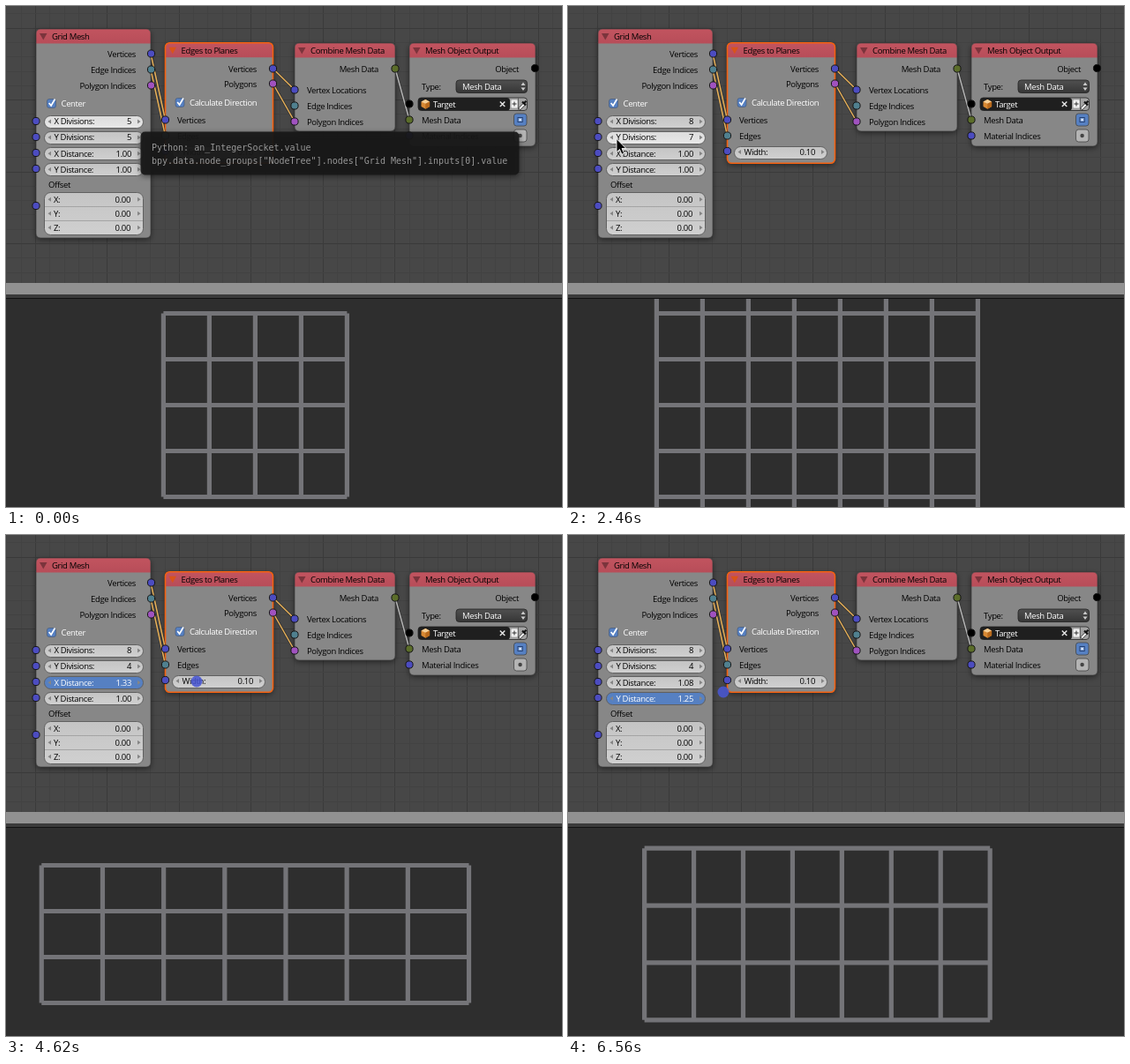
Recreate the animation shown at these times as an HTML page. Size 630 by 568 pixels, loop 6.6 s.

```html
<!DOCTYPE html>
<html lang="en">
<head>
<meta charset="utf-8">
<title>Grid mesh nodes</title>
<style>
  html, body { margin: 0; width: 100%; height: 100%; overflow: hidden; background: #2e2e2e; }
  svg { display: block; width: 630px; height: 568px; }
  text { font: 9.5px "Open Sans", "Noto Sans", sans-serif; letter-spacing: -.36px; white-space: pre; }
  .mono { font: 10px "DejaVu Sans Mono", monospace; letter-spacing: 0; }
</style>
</head>
<body>
<svg id="stage" viewBox="0 0 630 568" xmlns="http://www.w3.org/2000/svg">
  <defs>
    <linearGradient id="header" x2="0" y2="1"><stop stop-color="#c2545f"/><stop offset="1" stop-color="#b74d59"/></linearGradient>
    <linearGradient id="normal" x2="0" y2="1"><stop stop-color="#c4c4c4"/><stop offset="1" stop-color="#d0d0d0"/></linearGradient>
    <linearGradient id="hover" x2="0" y2="1"><stop stop-color="#dcdcdc"/><stop offset="1" stop-color="#e8e8e8"/></linearGradient>
    <linearGradient id="menu" x2="0" y2="1"><stop stop-color="#505050"/><stop offset="1" stop-color="#363636"/></linearGradient>
    <filter id="shadow" x="-15%" y="-15%" width="130%" height="130%">
      <feDropShadow dx="0" dy="2" stdDeviation="3" flood-color="#000" flood-opacity=".5"/>
    </filter>
    <clipPath id="viewport"><rect y="332" width="630" height="236"/></clipPath>
  </defs>
</svg>
<script>
const LOOP = 6600;
const UNIT = 52, CENTER_X = 282.4, CENTER_Y = 452.5;
const DRAG_RATE = 333;
const GRID_STEP = 16.29;
const BLUE = '#4c4cc0', TEAL = '#50808f', PURPLE = '#a052bf', OLIVE = '#5b6d2a', BLACK = '#000';
const stage = document.getElementById('stage');

function add(tag, attrs, parent = stage) {
  const el = document.createElementNS('http://www.w3.org/2000/svg', tag);
  for (const key in attrs) el.setAttribute(key, attrs[key]);
  parent.appendChild(el);
  return el;
}
const rect = (x, y, width, height, fill, more) => add('rect', { x, y, width, height, fill, ...more });
const path = (d, more) => add('path', { d, fill: 'none', ...more });

function label(x, y, text, fill = '#000', anchor = 'start') {
  const el = add('text', { x, y: y + 3.4, fill, 'text-anchor': anchor });
  el.textContent = text;
  return el;
}

function socket(cx, cy, fill) {
  add('circle', { cx, cy, r: 4.1, fill, stroke: '#151515', 'stroke-width': 1 });
}

function backdrop() {
  rect(0, 0, 630, 314, '#474747');
  const line = (d, major) => path(d, { stroke: major ? '#3a3a3a' : '#424242' });
  for (let i = -2; i < 37; i++) line(`M${Math.round(33 + i * GRID_STEP) + .5} 0V314`, i % 5 === 0);
  for (let i = -2; i < 17; i++) line(`M0 ${Math.round(269 - i * GRID_STEP) + .5}H630`, i % 5 === 0);
}

function node(x, y, w, h, title, active) {
  rect(x, y, w, h, '#878787', { rx: 5, filter: 'url(#shadow)' });
  path(`M${x} ${y + 16.5}V${y + 5}a5 5 0 0 1 5 -5H${x + w - 5}a5 5 0 0 1 5 5V${y + 16.5}Z`, { fill: 'url(#header)' });
  rect(x, y, w, h, 'none', { rx: 5, stroke: active ? '#f4600f' : '#3b3b3b', 'stroke-width': active ? 1.6 : .7 });
  path(`M${x + 4} ${y + 5}h8.5l-4.2 7.5Z`, { fill: active ? '#d9541a' : '#7b343c' });
  label(x + 18, y + 8.8, title);
}

function arrows(x, y, w) {
  return path(`M${x + 8} ${y - 2.5}l-3.5 2.5 3.5 2.5ZM${x + w - 7} ${y - 2.5}l3.5 2.5 -3.5 2.5Z`, { fill: '#858585' });
}

const FIELD_EDGE = { stroke: '#606060', 'stroke-width': 1 };

function numberField(x, y, w, name, value) {
  const box = rect(x + .5, Math.round(y - 7) + .5, w - 1, 14, 'url(#normal)', { rx: 7, ...FIELD_EDGE });
  arrows(x, y, w);
  return { y, box, name: label(x + 11.5, y, name), value: label(x + w - 14, y, value, '#000', 'end') };
}

function checkbox(x, y, name) {
  rect(x - 5, y - 5, 10, 10, '#5680c2', { rx: 2.5, stroke: '#46597a', 'stroke-width': .7 });
  path(`M${x - 2.8} ${y - .5}l2.4 3L${x + 4} ${y - 5}`, { stroke: '#fff', 'stroke-width': 1.7 });
  label(x + 11, y, name, '#fff');
}

function toggle(y, on) {
  rect(575.5, y - 7, 14.5, 14, on ? '#5680c2' : '#b4b4b4', { rx: 3, stroke: '#444', 'stroke-width': .8 });
  if (on) rect(580, y - 2.5, 5.2, 5, '#86a8dc', { stroke: '#243f70' });
  add('circle', { cx: 582.6, cy: y, r: on ? 1.1 : 2.2, fill: on ? '#fff' : '#444' });
}

function wire(x1, y1, x2, y2, color) {
  const d = `M${x1} ${y1}L${x2} ${y2}`;
  path(d, { stroke: '#222', 'stroke-width': 2.8, opacity: .6 });
  path(d, { stroke: color, 'stroke-width': 1.5 });
}

backdrop();

node(34, 26, 130, 237, 'Grid Mesh');
['Vertices', 'Edge Indices', 'Polygon Indices'].forEach((name, i) => label(147, 54.5 + i * 18, name, '#000', 'end'));
checkbox(51.5, 110.5, 'Center');
const fields = [['X Divisions:', 131], ['Y Divisions:', 149], ['X Distance:', 167.3], ['Y Distance:', 185.3]]
  .map(([name, y]) => numberField(43, y, 113, name, ''));
label(48, 202.5, 'Offset');
rect(43.5, 211.5, 112, 48, 'url(#normal)', { rx: 7, ...FIELD_EDGE });
path('M44 227.5H155M44 243.5H155', { stroke: '#a4a4a4' });
['X:', 'Y:', 'Z:'].forEach((name, i) => {
  const y = 219.3 + i * 16;
  arrows(43, y, 113);
  label(54, y, name);
  label(141, y, '0.00', '#000', 'end');
});

node(180.5, 41.7, 122, 136.6, 'Edges to Planes', true);
label(284, 71.5, 'Vertices', '#000', 'end');
label(284, 88.5, 'Polygons', '#000', 'end');
checkbox(197, 109.5, 'Calculate Direction');
label(194, 129.5, 'Vertices');
label(194, 147.5, 'Edges');
numberField(188, 165.5, 106, 'Width:', '0.10');

node(327, 42, 114, 100, 'Combine Mesh Data');
label(422, 71.5, 'Mesh Data', '#000', 'end');
['Vertex Locations', 'Edge Indices', 'Polygon Indices'].forEach((name, i) => label(341, 95.5 + i * 18, name));

node(457, 42, 143, 117, 'Mesh Object Output');
label(581, 71.5, 'Object', '#000', 'end');
label(471, 91.5, 'Type:');
rect(510, 84, 80.5, 14.5, 'url(#menu)', { rx: 3.5, stroke: '#222', 'stroke-width': .8 });
label(517, 91.3, 'Mesh Data', '#fff');
path('M583.5 90l2.5 -3.5 2.5 3.5ZM583.5 92.5l2.5 3.5 2.5 -3.5Z', { fill: '#ccc' });
rect(467, 104, 123.5, 14.5, '#a4a4a4', { rx: 3.5, stroke: '#222', 'stroke-width': .8 });
rect(467, 104, 104, 14.5, '#1f1f1f', { rx: 3.5 });
path('M470.5 108.5l4.8 -2.4 4.8 2.4v5.6l-4.8 2.6 -4.8 -2.6Z', { fill: '#d98a35' });
path('M470.5 108.5l4.8 -2.4 4.8 2.4 -4.8 2.3Z', { fill: '#f6cf96' });
path('M475.3 110.8v5.9l4.8 -2.6v-5.6Z', { fill: '#b96a1c' });
label(484, 111.3, 'Target', '#fff');
path('M559.8 108.5l5.5 5.5m0 -5.5l-5.5 5.5', { stroke: '#e8e8e8', 'stroke-width': 1.4 });
path('M580.5 104V118.5', { stroke: '#555', 'stroke-width': .8 });
rect(572.5, 106.5, 7, 9, '#f2f2f2', { rx: 1 });
path('M576 108.5v5m-2.5 -2.5h5', { stroke: '#333', 'stroke-width': 1 });
path('M581.5 117l5.5 -5.5', { stroke: '#333', 'stroke-width': 3.4 });
path('M582 116.5l5 -5', { stroke: '#fff', 'stroke-width': 2 });
path('M585 108.5l4 4M586.5 111l2.9 -3.4', { stroke: '#111', 'stroke-width': 2.2 });
label(471, 129.5, 'Mesh Data');
label(471, 147.5, 'Material Indices');
toggle(129, true);
toggle(147, false);

const ORANGE = '#e6b05a';
wire(164, 54, 180.5, 129, ORANGE);
wire(164, 72, 180.5, 147, ORANGE);
wire(302.5, 71, 327, 95, ORANGE);
wire(302.5, 88, 327, 131, ORANGE);
wire(441, 71, 457, 129, '#b4b4b4');

[
  [164.5, 54, BLUE], [164.5, 72, TEAL], [164.5, 90, PURPLE],
  ...[130.5, 148.5, 166.5, 184.5, 226.5].map(y => [34, y, BLUE]),
  [302.5, 71, BLUE], [302.5, 88, PURPLE],
  [180.5, 129, BLUE], [180.5, 147, TEAL], [180.5, 164.5, BLUE],
  [441, 71, OLIVE], [327, 95, BLUE], [327, 113, TEAL], [327, 131, PURPLE],
  [599.5, 70.5, BLACK], [457, 111, BLACK], [457, 129, OLIVE], [457, 147, BLUE]
].forEach(args => socket(...args));

rect(0, 314, 630, 13, '#919191');
rect(0, 327, 630, 4, '#3a3a3a');
rect(0, 331, 630, 1, '#111');
rect(0, 332, 630, 236, '#2e2e2e');
const mesh = path('', { stroke: '#747478', 'stroke-width': 5.2, 'clip-path': 'url(#viewport)' });

const tooltip = add('g', {});
add('rect', { x: 152.5, y: 142.5, width: 429, height: 49, rx: 5, fill: '#191919', 'fill-opacity': .92, filter: 'url(#shadow)' }, tooltip);
['Python: an_IntegerSocket.value', 'bpy.data.node_groups["NodeTree"].nodes["Grid Mesh"].inputs[0].value'].forEach((line, i) => {
  add('text', { x: 165, y: 163.7 + i * 15, fill: '#979797', class: 'mono' }, tooltip).textContent = line;
});

const ripple = add('circle', { fill: 'rgb(72,86,210)' });
const cursor = path('M0 0V15.2L3.5 12 6 17.8 8.6 16.6 6.1 11H10.8Z', { fill: '#000', stroke: '#fff', 'stroke-width': .9 });

// Release times of the arrow clicks and the spans of the two drags.
const xClicks = [760, 1000, 1250];
const yClicksUp = [1720, 2000];
const yClicksDown = [2680, 2940, 3200];
const clicks = [...xClicks, ...yClicksUp, ...yClicksDown];
const xDrag = { from: 3885, to: 5300, x: 106 };
const yDrag = { from: 5650, to: LOOP, x: 93.4 };
const PRESSED_RADIUS = 6.5;

// Pointer stops: time, x, y.
const stops = [
  [0, 148, 130], [1400, 148, 130], [1600, 147, 150], [2050, 147, 150], [2420, 55, 151],
  [3300, 54, 150], [3800, 106, 166], [3980, 106, 166], [4620, 216, 165], [4680, 215, 165],
  [5280, 131.2, 166], [5620, 93.4, 185], [5730, 93.4, 185], [6290, 203, 176], [6560, 176, 177]
];

const passed = (times, t) => times.filter(time => t >= time).length;
const within = (drag, t) => t >= drag.from && t < drag.to;

function pointerAt(t) {
  const i = stops.findIndex(stop => stop[0] > t);
  if (i < 0) return stops[stops.length - 1].slice(1);
  const [t0, x0, y0] = stops[i - 1], [t1, x1, y1] = stops[i];
  const p = (t - t0) / (t1 - t0), k = p * p * (3 - 2 * p);
  return [x0 + (x1 - x0) * k, y0 + (y1 - y0) * k];
}

function dragValue(drag, t) {
  if (t < drag.from) return 1;
  const [x] = pointerAt(Math.min(t, drag.to - 20));
  return 1 + (x - drag.x) / DRAG_RATE;
}

function rippleAt(t) {
  const drag = [xDrag, yDrag].find(d => within(d, t));
  if (drag) return [PRESSED_RADIUS * Math.min(1, (t - drag.from) / 100), .87];
  const release = clicks.find(time => t >= time - 90 && t < time + 240);
  if (!release) return [0, 0];
  const age = t - release;
  if (age < 0) return [PRESSED_RADIUS * (age + 90) / 90, .87];
  return [PRESSED_RADIUS + 10 * age / 240, .87 * (1 - age / 240)];
}

function meshPath(nx, ny, dx, dy) {
  const w = (nx - 1) * dx * UNIT, h = (ny - 1) * dy * UNIT;
  const left = CENTER_X - w / 2, top = CENTER_Y - h / 2;
  let d = '';
  for (let i = 0; i < nx; i++) d += `M${left + i * dx * UNIT} ${top}v${h}`;
  for (let i = 0; i < ny; i++) d += `M${left} ${top + i * dy * UNIT}h${w}`;
  return d;
}

function render(t) {
  const nx = 5 + passed(xClicks, t);
  const ny = 5 + passed(yClicksUp, t) - passed(yClicksDown, t);
  const dx = dragValue(xDrag, t), dy = dragValue(yDrag, t);
  const [x, y] = pointerAt(t);
  const dragged = within(xDrag, t) ? 2 : within(yDrag, t) ? 3 : -1;

  [nx, ny, dx.toFixed(2), dy.toFixed(2)].forEach((value, i) => {
    const field = fields[i], active = i === dragged;
    const hovered = dragged < 0 && Math.abs(y + 1 - field.y) < 8;
    field.box.setAttribute('fill', active ? '#5680c2' : hovered ? 'url(#hover)' : 'url(#normal)');
    field.value.textContent = value;
    for (const el of [field.name, field.value]) el.setAttribute('fill', active ? '#fff' : '#000');
  });

  mesh.setAttribute('d', meshPath(nx, ny, dx, dy));
  tooltip.setAttribute('display', t < 580 ? 'inline' : 'none');
  cursor.setAttribute('display', t < 580 || dragged >= 0 ? 'none' : 'inline');
  cursor.setAttribute('transform', `translate(${x} ${y - .5})`);
  const [r, opacity] = rippleAt(t);
  ripple.setAttribute('cx', x);
  ripple.setAttribute('cy', y + 1);
  ripple.setAttribute('r', r);
  ripple.setAttribute('opacity', opacity);
}

const start = performance.now();
function tick() {
  render((performance.now() - start) % LOOP);
  requestAnimationFrame(tick);
}
render(0);
requestAnimationFrame(tick);
</script>
</body>
</html>
```
